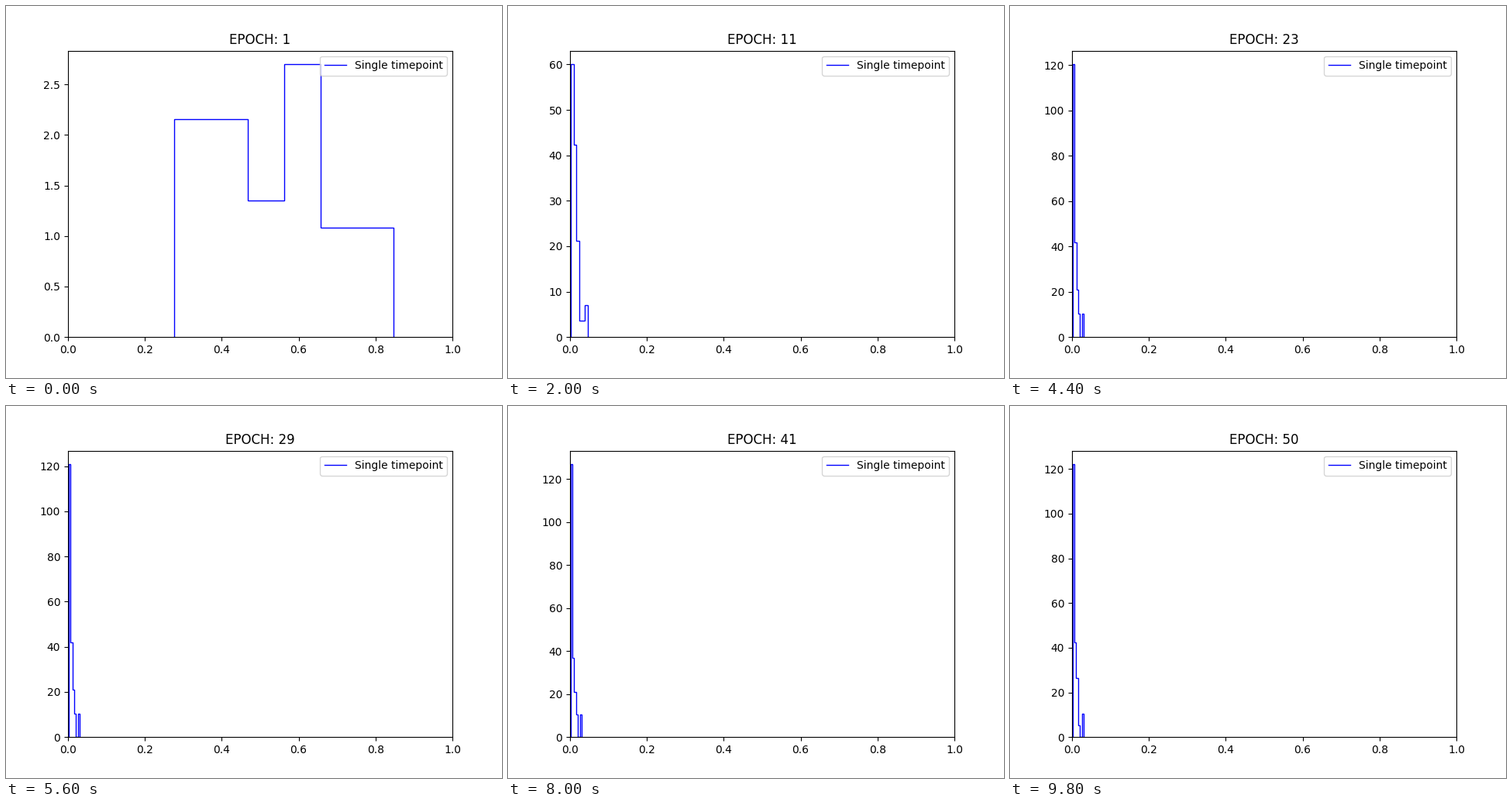
These frames come from a looping animation (640 by 480 pixels, 10000 ms). A matplotlib script:

```python
import numpy as np
import matplotlib.pyplot as plt
from matplotlib.animation import FuncAnimation
from matplotlib.lines import Line2D

EPOCHS = 50
INTERVAL = 200

# Key points of the collapse: epoch, bin width, samples per bin
KEYS = [
    (1, 0.095, (8, 8, 5, 10, 4, 4)),
    (4, 0.010495, (21, 9, 2, 3, 3, 1)),
    (11, 0.00726, (17, 12, 6, 1, 1, 2)),
    (23, 0.0049, (23, 8, 4, 2, 0, 2)),
    (50, 0.00483, (23, 8, 5, 1, 0, 2)),
]
SETTLED = 23


def between(epoch, values):
    """Interpolate over log time, since the collapse slows down."""
    return np.interp(np.log(epoch), np.log([k[0] for k in KEYS]), values)


def bins_at(epoch):
    """Bin edges and whole counts, with the sample size kept constant."""
    width = np.exp(between(epoch, np.log([k[1] for k in KEYS])))
    left = width * (0.285 + 2.63 * 0.1 ** (epoch - 1))
    edges = left + width * np.arange(7)

    totals = np.cumsum([k[2] for k in KEYS], axis=1).T
    counts = np.diff([np.floor(between(epoch, t)) for t in totals], prepend=0)
    if epoch >= SETTLED:
        # one sample wanders between the first two bins
        wobble = np.round(0.65 * np.cos(1.5 * (epoch - 41)))
        counts[0] += wobble
        counts[1] -= wobble
    return edges, counts


def draw(frame):
    epoch = frame + 1
    edges, counts = bins_at(epoch)
    ax.cla()
    ax.hist((edges[:-1] + edges[1:]) / 2, bins=edges, weights=counts,
            density=True, histtype="step", color="blue")
    ax.set_xlim(0, 1)
    ax.set_title(f"EPOCH: {epoch}", pad=6.5)
    ax.legend([Line2D([], [], color="blue", lw=1)], ["Single timepoint"],
              loc="upper right")
    return []


fig, ax = plt.subplots(figsize=(6.4, 4.8), dpi=100)
anim = FuncAnimation(fig, draw, frames=EPOCHS, init_func=lambda: draw(0),
                     interval=INTERVAL, repeat=True, repeat_delay=0)
plt.show()
```
